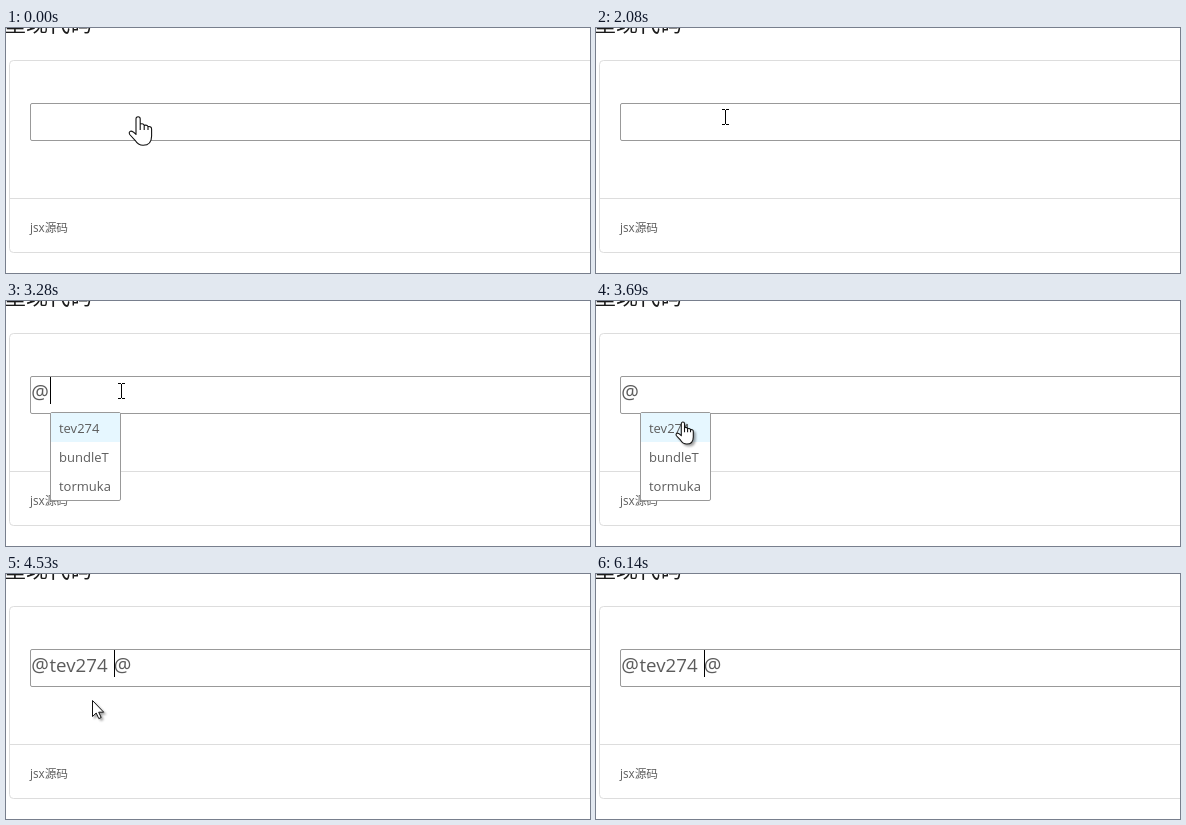
Write an HTML page that moves like this. It is 584 by 245 pixels and loops after 6.5 s.

```html
<!DOCTYPE html>
<html lang="zh">
<head>
<meta charset="utf-8">
<title>Mentions</title>
<style>
  html, body { margin: 0; width: 100%; height: 100%; overflow: hidden; background: #fff; }
  svg { display: block; }
  text { font-family: "Open Sans", "Noto Sans CJK SC", "Noto Sans CJK", sans-serif; fill: #5c5c5c; white-space: pre; }
  .box { fill: #fff; stroke: #999; }
  .card { fill: none; stroke: #ddd; }
  .heading { font-size: 22px; font-weight: 500; fill: #1a1a1a; }
  .label { font-size: 11.7px; }
  .value { font-size: 18.7px; }
  .at { font-size: 19.6px; }
  .option { font-size: 13px; }
  .pointer { fill: #fff; stroke: #111; stroke-linejoin: round; }
  .shadow { filter: drop-shadow(2px 2px 1px rgba(0, 0, 0, .35)); }
</style>
</head>
<body>
<svg width="584" height="245" viewBox="0 0 584 245">
  <defs>
    <path id="palm" d="M7.5 18.5V2.8a2.1 2.1 0 0 1 4.2 0V8q3.6-.8 4 1.4q3-.8 3.8 1.2q3.6-.6 3.6 2.6V20q0 9.3-8.5 9.3q-5 0-8-5L1.2 18.5q-1.2-2.5.8-3.3q2-.6 5.5 3.3ZM11.7 8v6M15.7 9.4V14M19.5 10.6V14"/>
  </defs>
  <text class="heading" x="-2" y="3">重现代码</text>
  <rect class="card" x="3.5" y="32.5" width="600" height="192" rx="4"/>
  <path class="card" d="M4 170.5H584"/>
  <text class="label" x="24" y="204">jsx源码</text>

  <rect class="box" x="24.5" y="75.5" width="600" height="37" rx="1.5"/>
  <g class="value">
    <text id="trigger" class="at" x="25.3" y="98">@</text>
    <g id="mention">
      <text x="43.5" y="98">tev274</text>
      <text class="at" x="107.8" y="98">@</text>
    </g>
  </g>
  <rect id="caret" y="76" width="1" height="27"/>

  <g id="popup" class="option">
    <rect class="box" x="44.5" y="111.5" width="70" height="88" rx="1.5"/>
    <path fill="#e6f7ff" d="M45 112H114V141H45Z"/>
    <text x="53" y="132">tev274</text>
    <text x="53" y="161">bundleT</text>
    <text x="53" y="190">tormuka</text>
  </g>

  <g id="cursor">
    <use id="bigHand" class="pointer" href="#palm" stroke-width="1.1"/>
    <path id="beam" fill="none" stroke="#000" d="M-3.5-7.5H-.5M.5-7.5H3.5M0-7V7M-3.5 7.5H-.5M.5 7.5H3.5"/>
    <g id="hand" class="shadow"><use class="pointer" href="#palm" transform="scale(.77)" stroke-width="1.4"/></g>
    <path id="arrow" class="pointer shadow" d="M.5.5V16.5L4.2 13L6.8 18.6L9.2 17.5L6.7 12.2H11.7Z"/>
  </g>
</svg>
<script>
  const LOOP = 6500;
  const $ = id => document.getElementById(id);
  const shapes = ["bigHand", "beam", "hand", "arrow"];

  // time, shape, x, y
  const cursorSteps = [
    [0, "bigHand", 122.5, 88],
    [460, "beam", 131.5, 89],
    [2080, "beam", 129.5, 89],
    [2120, "beam", 122.5, 90],
    [2160, "beam", 117.5, 90],
    [3100, "beam", 115.5, 90],
    [3410, "beam", 113.5, 93],
    [3450, "beam", 109.5, 98],
    [3500, "beam", 104.5, 104],
    [3550, "hand", 90, 111],
    [3590, "hand", 86, 115],
    [3640, "hand", 82, 118],
    [3690, "hand", 79.5, 120.5],
    [3740, "hand", 78, 121],
    [3790, "hand", 77, 121],
    [4530, "arrow", 86, 126],
    [4580, "arrow", 105, 131],
    [4650, "arrow", 130, 136],
    [4710, "arrow", 145, 137],
    [4800, "arrow", 127, 138],
    [4890, "arrow", 110, 139],
    [4940, "none", 0, 0]
  ];

  // time, caret x (0 = hidden)
  const caretSteps = [
    [0, 0], [2310, 25], [2670, 0], [2720, 25], [3100, 0], [3130, 44], [3640, 0],
    [4100, 108], [4610, 0], [5120, 108], [5630, 0], [6140, 108]
  ];

  const stepAt = (steps, t) => steps.findLast(step => step[0] <= t);
  const show = (id, on) => { $(id).style.display = on ? "" : "none"; };

  function draw(t) {
    const [, shape, x, y] = stepAt(cursorSteps, t);
    const [, caretX] = stepAt(caretSteps, t);
    shapes.forEach(id => show(id, id === shape));
    $("cursor").setAttribute("transform", `translate(${x} ${y})`);
    show("caret", caretX > 0);
    $("caret").setAttribute("x", caretX);
    show("trigger", t >= 3100);
    show("mention", t >= 4020);
    show("popup", t >= 3280 && t < 4020);
  }

  function tick() {
    draw(performance.now() % LOOP);
    requestAnimationFrame(tick);
  }
  tick();
</script>
</body>
</html>
```
